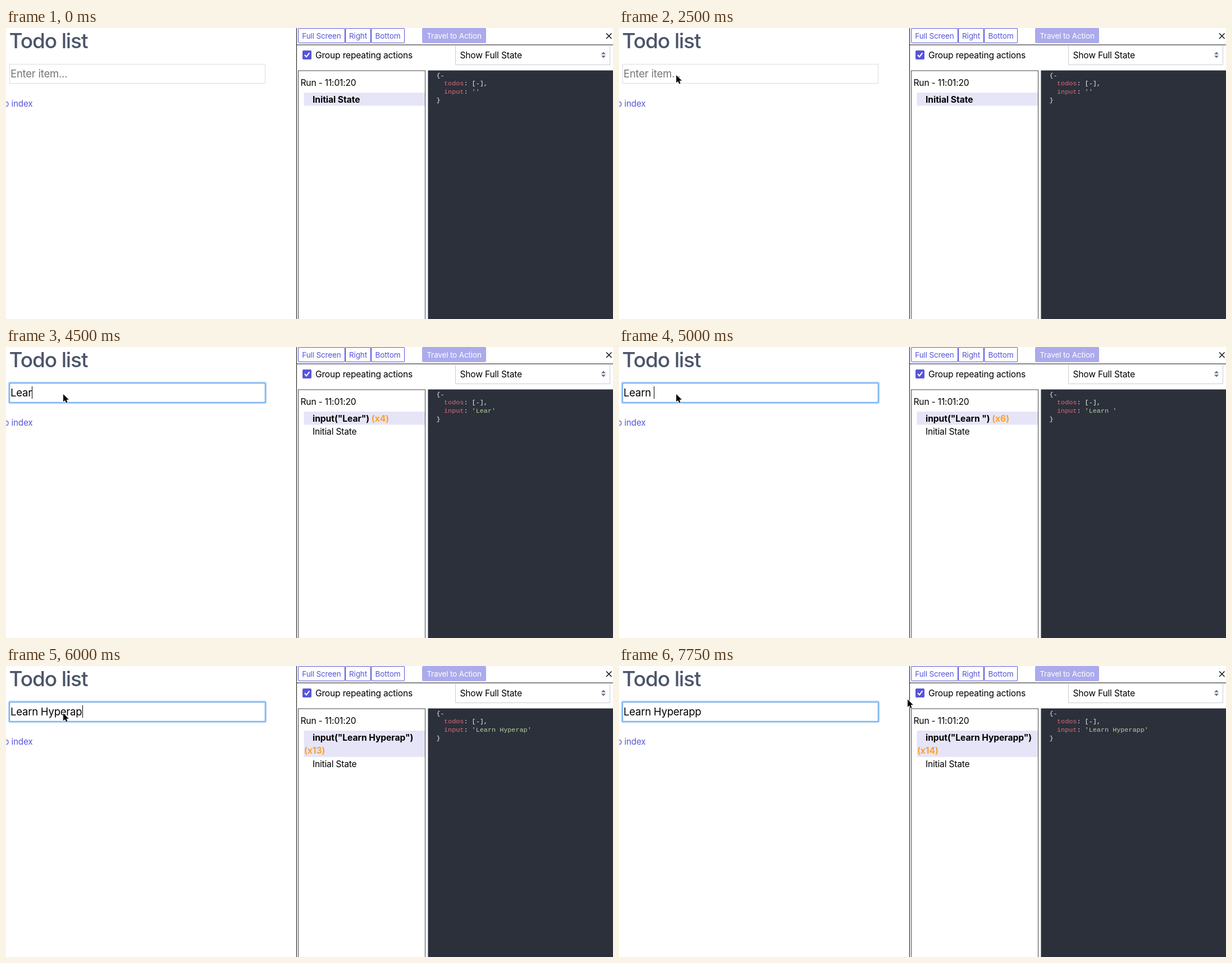
These frames come from a looping animation (1081 px wide and 518 px high, 8000 ms). An HTML page:

```html
<!DOCTYPE html>
<html lang="en">
<head>
<meta charset="utf-8">
<title>Todo list with state debugger</title>
<style>
  html, body { margin: 0; width: 100%; height: 100%; overflow: hidden; background: #fff; }
  svg { display: block; width: 1081px; height: 518px; }
  text {
    font: 15.6px Inter, Roboto, sans-serif;
    letter-spacing: -.012em;
    font-feature-settings: "calt" 0;
    white-space: pre;
  }
  .title { font-size: 37px; font-weight: 500; letter-spacing: -.03em; fill: #4b556a; }
  .field { font-size: 18.5px; }
  .link { font-size: 15.3px; fill: #5755d9; text-anchor: end; }
  .button text { font-size: 13.6px; fill: #5755d9; text-anchor: middle; }
  .button rect { fill: #fff; stroke: #5755d9; }
  .button.off rect { fill: #abaaec; stroke: #abaaec; }
  .button.off text { fill: #fff; }
  .bold { font-weight: 700; letter-spacing: -.003em; }
  .count { fill: #ffa02c; }
  .code text { font: 11.8px "Liberation Mono", "DejaVu Sans Mono", monospace; letter-spacing: 0; fill: #eceef2; }
  .code .key { fill: #e0697a; }
  .code .string { fill: #b5d39c; }
</style>
</head>
<body>
<svg viewBox="0 0 1081 518">
  <rect width="1081" height="518" fill="#fff"/>

  <text class="title" x="5.5" y="36">Todo list</text>
  <rect id="border" x="6.5" y="64.5" width="455" height="34" fill="#fff" stroke="#dcdcdc"/>
  <g id="focus" fill="none">
    <rect x="5.5" y="63.5" width="457" height="36" rx="2" stroke="#d3e6fb" stroke-width="4.5"/>
    <rect x="6" y="64" width="456" height="35" rx="1.5" stroke="#7fb6f3" stroke-width="2.2"/>
  </g>
  <text id="field" class="field" x="8" y="88"></text>
  <rect id="caret" y="70" width="1" height="22"/>
  <text class="link" x="47.5" y="140">Back to index</text>

  <path d="M517.5 0V518M517 30H1081" stroke="#111" fill="none"/>
  <g id="buttons"></g>
  <path d="M1069 9.5l9.5 9.5M1078.5 9.5l-9.5 9.5" stroke="#111" stroke-width="1.5"/>

  <rect x="528" y="40" width="16" height="16" rx="2" fill="#5755d9"/>
  <path d="M532 48l3 3.4 5.4-7" fill="none" stroke="#fff" stroke-width="2"/>
  <text x="551" y="54">Group repeating actions</text>
  <path d="M800.5 30.5V65.5H1075.5V30.5" fill="none" stroke="#c8ccd6"/>
  <text x="808.5" y="54">Show Full State</text>
  <path d="M1060 46.8l4-4.3 4 4.3zM1060 49.2l4 4.3 4-4.3z" fill="#667189"/>

  <rect x="520.5" y="76" width="226" height="450" fill="#fff" stroke="#444"/>
  <text x="524.5" y="103">Run - 11:01:20</text>
  <rect id="highlight" x="530.5" y="115" width="215.5" fill="#e5e5f7"/>
  <text class="bold" x="546" y="132.5"><tspan id="action"></tspan><tspan id="inlineCount" class="count"></tspan></text>
  <text id="wrappedCount" class="bold count" x="531" y="156"></text>
  <text id="initial" x="546">Initial State</text>

  <rect x="751.5" y="75.5" width="340" height="450" fill="#2b303b"/>
  <g class="code">
    <text x="766.5" y="88">{-</text>
    <text x="780" y="102"><tspan class="key">todos</tspan>: [-],</text>
    <text x="780" y="117"><tspan class="key">input</tspan>: <tspan id="value" class="string"></tspan></text>
    <text x="766.5" y="132">}</text>
  </g>

  <path id="pointer" d="M0 0V13.5L3.1 10.7L5.1 15.4L7.5 14.4L5.5 9.8H9.8Z" stroke="#fff" stroke-width="1.6" paint-order="stroke"/>
</svg>
<script>
const LOOP = 8000;
const PHRASE = "Learn Hyperapp";
const FOCUS_TIME = 2750;

// [time, value...]: each entry holds until the next one
const typed = [
  [0, 0], [3750, 1], [4000, 3], [4500, 4], [4750, 5], [5000, 6],
  [5250, 7], [5500, 9], [5750, 11], [6000, 13], [6250, 14]
];
const pointerPath = [
  [1250, 271.5, 11.5], [1500, 97, 82], [1750, 82, 83], [2000, 82, 84],
  [2250, 91, 84], [2500, 102, 84], [7000, 329.5, 106.5],
  [7250, 439.5, 110.5], [7500, 500, 72], [7750, 514, 59.5]
];

const $ = id => document.getElementById(id);
const at = (steps, time) => steps.filter(step => step[0] <= time).pop();
const show = (id, visible) => $(id).setAttribute("visibility", visible ? "visible" : "hidden");

function button(label, left, right, style = "") {
  return `<g class="button ${style}">
    <rect x="${left + .5}" y=".5" width="${right - left - 1}" height="26" rx="1.5"/>
    <text x="${(left + right) / 2}" y="19">${label}</text></g>`;
}

$("buttons").innerHTML =
  button("Full Screen", 520, 604) +
  button("Right", 604, 650) +
  button("Bottom", 650, 710) +
  button("Travel to Action", 741, 855, "off");

function drawField(time, text, lastKey) {
  const focused = time >= FOCUS_TIME;
  const field = $("field");
  field.textContent = text || "Enter item...";
  field.setAttribute("fill", text ? "#000" : "#757575");
  show("border", !focused);
  show("focus", focused);

  const idle = time - Math.max(FOCUS_TIME, lastKey);
  show("caret", focused && Math.floor(idle / 500) % 2 === 0);
  $("caret").setAttribute("x", Math.round(8.5 + (text ? field.getComputedTextLength() : 0)));
}

function drawDebugger(text) {
  const count = text.length;
  const wrapped = count > 10;
  const label = count > 1 ? `(x${count})` : "";
  const rows = wrapped ? 2 : 1;
  $("action").textContent = count ? `input("${text}")` : "Initial State";
  $("inlineCount").textContent = wrapped ? "" : " " + label;
  $("wrappedCount").textContent = wrapped ? label : "";
  $("highlight").setAttribute("height", 23.5 * rows);
  $("initial").setAttribute("y", 132.5 + 23.5 * rows);
  show("initial", count > 0);
  $("value").textContent = `'${text}'`;
}

function render(time) {
  const [lastKey, count] = at(typed, time);
  const text = PHRASE.slice(0, count);
  drawField(time, text, lastKey);
  drawDebugger(text);

  const pointer = at(pointerPath, time);
  show("pointer", pointer);
  if (pointer) $("pointer").setAttribute("transform", `translate(${pointer[1]} ${pointer[2]})`);
}

const start = performance.now();
function tick() {
  render((performance.now() - start) % LOOP);
  requestAnimationFrame(tick);
}
tick();
</script>
</body>
</html>
```
